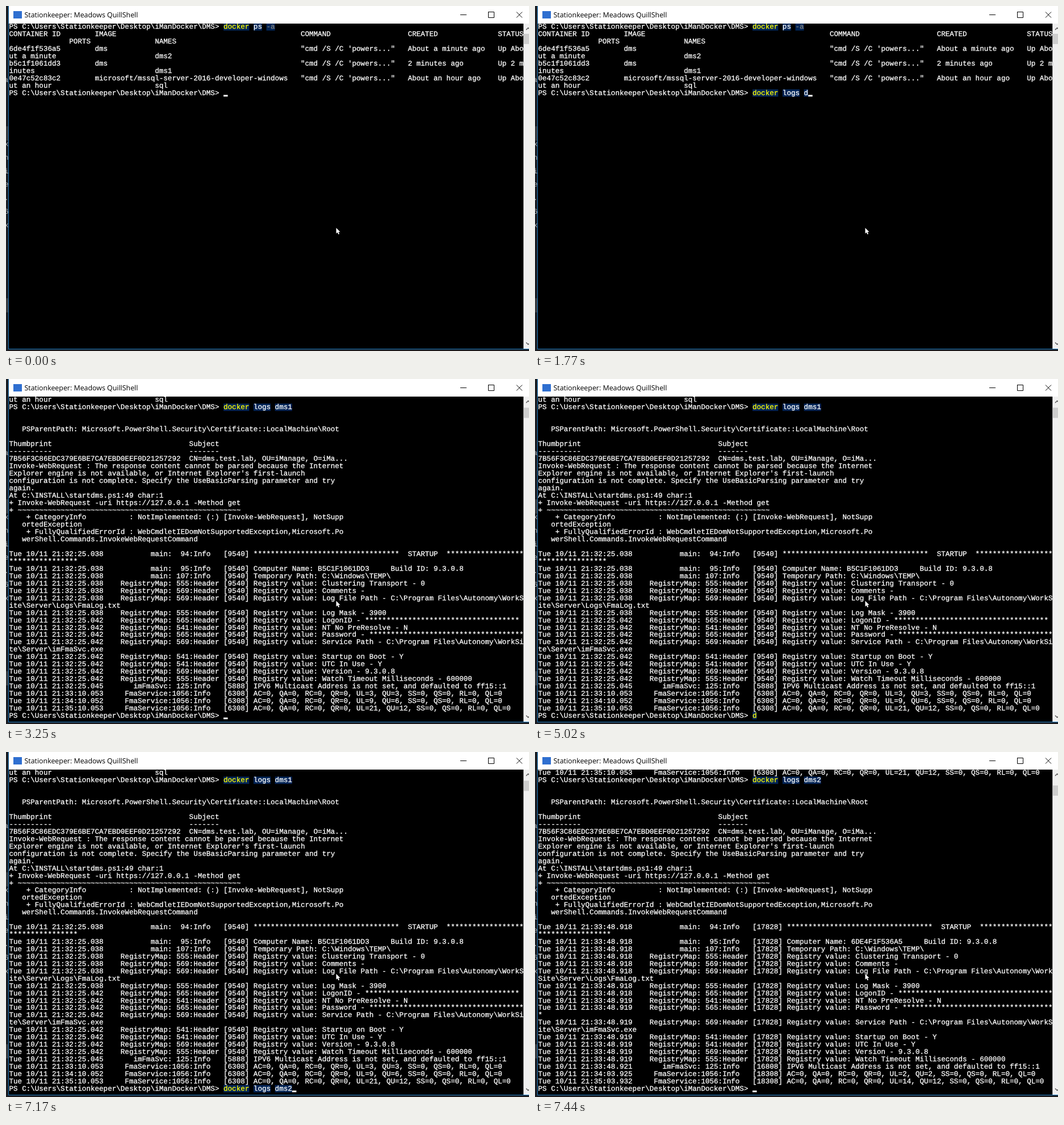
These frames come from a looping animation (921 px wide and 608 px high, 8000 ms). An HTML page with a canvas:

```html
<!DOCTYPE html>
<html lang="en">
<head>
<meta charset="utf-8">
<title>Terminal</title>
<style>
html, body { margin: 0; width: 100%; height: 100%; overflow: hidden; background: #000; }
canvas { display: block; }
</style>
</head>
<body>
<canvas id="stage" width="921" height="608"></canvas>
<script>
const ctx = document.getElementById('stage').getContext('2d');
const LOOP = 8000, COLS = 120, ROWS = 44;
const CELL_W = 7.55, CELL_H = 12.94, LEFT = 5.5, TOP = 30.4;
const RIGHT = LEFT + COLS * CELL_W, BAR_H = 31;
const MONO = '12.58px "Liberation Mono", "DejaVu Sans Mono", monospace';
const PROMPT = 'PS C:\\Users\\Stationkeeper\\Desktop\\iManDocker\\DMS> ';

// ---- Transcript ----
const wrap = line => line.match(new RegExp(`.{1,${COLS}}`, 'g')) || [''];
const stars = n => '*'.repeat(n);

const tableRow = cells => cells.map((c, i) => c.padEnd([20, 48, 25, 21, 20, 20][i])).join('');
const container = (id, image, created, status, name) =>
  tableRow([id, image, '"cmd /S /C \'powers..."', created, status, '', name]);

const listing = [
  PROMPT + 'docker ps -a',
  tableRow(['CONTAINER ID', 'IMAGE', 'COMMAND', 'CREATED', 'STATUS', 'PORTS', 'NAMES']),
  container('6de4f1f536a5', 'dms', 'About a minute ago', 'Up About a minute', 'dms2'),
  container('b5c1f1061dd3', 'dms', '2 minutes ago', 'Up 2 minutes', 'dms1'),
  container('0e47c52c83c2', 'microsoft/mssql-server-2016-developer-windows',
    'About an hour ago', 'Up About an hour', 'sql')
];

const request = 'Invoke-WebRequest -uri https://127.0.0.1 -Method get';
const startError = [
  '', '',
  '   PSParentPath: Microsoft.PowerShell.Security\\Certificate::LocalMachine\\Root',
  '',
  'Thumbprint'.padEnd(42) + 'Subject',
  '-'.repeat(10).padEnd(42) + '-'.repeat(7),
  '7B56F3C86EDC379E6BE7CA7EBD0EEF0D21257292  CN=dms.test.lab, OU=iManage, O=iMa...',
  'Invoke-WebRequest : The response content cannot be parsed because the Internet',
  "Explorer engine is not available, or Internet Explorer's first-launch",
  'configuration is not complete. Specify the UseBasicParsing parameter and try',
  'again.',
  'At C:\\INSTALL\\startdms.ps1:49 char:1',
  '+ ' + request,
  '+ ' + '~'.repeat(request.length),
  '    + CategoryInfo          : NotImplemented: (:) [Invoke-WebRequest], NotSupp',
  '   ortedException',
  '    + FullyQualifiedErrorId : WebCmdletIEDomNotSupportedException,Microsoft.Po',
  '   werShell.Commands.InvokeWebRequestCommand',
  ''
];

const entry = (time, name, num, level, pid, text) =>
  `Tue 10/11 ${time}${(name + ':').padStart(16)}${String(num).padStart(4)}:${level.padEnd(7)}[${pid}] ${text}`;

const server = 'C:\\Program Files\\Autonomy\\WorkSite\\Server\\';
const registry = [
  [555, 'Clustering Transport - 0'],
  [569, 'Comments -'],
  [569, `Log File Path - ${server}Logs\\FmaLog.txt`],
  [555, 'Log Mask - 3900'],
  [565, 'LogonID - ' + stars(36)],
  [541, 'NT No PreResolve - N'],
  [565, 'Password - ' + stars(36)],
  [569, `Service Path - ${server}imFmaSvc.exe`],
  [541, 'Startup on Boot - Y'],
  [541, 'UTC In Use - Y'],
  [569, 'Version - 9.3.0.8'],
  [555, 'Watch Timeout Milliseconds - 600000']
];

// Registry lines from index `split` on carry the later time stamp.
function serviceLog({ early, late, split, pid, host, ipv6, stats, statPid }) {
  const main = (num, text) => entry(early, 'main', num, 'Info', pid, text);
  return [
    ...startError,
    main(94, `${stars(34)}  STARTUP  ${stars(34)}`),
    main(95, `Computer Name: ${host}     Build ID: 9.3.0.8`),
    main(107, 'Temporary Path: C:\\Windows\\TEMP\\'),
    ...registry.map(([num, text], i) =>
      entry(i < split ? early : late, 'RegistryMap', num, 'Header', pid, 'Registry value: ' + text)),
    entry(ipv6[0], 'imFmaSvc', 125, 'Info', ipv6[1],
      'IPV6 Multicast Address is not set, and defaulted to ff15::1'),
    ...stats.map(([time, ul, qu]) => entry(time, 'FmaService', 1056, 'Info', statPid,
      `AC=0, QA=0, RC=0, QR=0, UL=${ul}, QU=${qu}, SS=0, QS=0, RL=0, QL=0`))
  ];
}

const firstLog = serviceLog({
  early: '21:32:25.038', late: '21:32:25.042', split: 4, pid: 9540, host: 'B5C1F1061DD3',
  ipv6: ['21:32:25.045', 5888], statPid: 6308,
  stats: [['21:33:10.053', 3, 3], ['21:34:10.052', 9, 6], ['21:35:10.053', 21, 12]]
});
const secondLog = serviceLog({
  early: '21:33:48.918', late: '21:33:48.919', split: 5, pid: 17828, host: '6DE4F1F536A5',
  ipv6: ['21:33:48.921', 16808], statPid: 18308,
  stats: [['21:34:03.925', 2, 2], ['21:35:03.932', 14, 12]]
});

const CMD1 = 'docker logs dms1', CMD2 = 'docker logs dms2';
const buffer1 = listing.flatMap(wrap);
const buffer2 = [...buffer1, PROMPT + CMD1, ...firstLog.flatMap(wrap)];
const buffer3 = [...buffer2, PROMPT + CMD2, ...secondLog.flatMap(wrap)];

// ---- Timeline ----
// [time, characters typed]
const typing1 = [[400, 2], [530, 3], [670, 5], [790, 6], [940, 8], [1220, 10], [1370, 11], [1490, 12],
  [1770, 13], [1890, 14], [2010, 15], [2560, 14], [2700, 15], [2980, 16]];
const typing2 = [[5020, 1], [5170, 3], [5290, 4], [5440, 6], [5590, 7], [5710, 8], [5860, 9],
  [5980, 10], [6100, 12], [6380, 13], [6530, 14], [6650, 15], [7170, 16]];
const caretOff = [[2410, 2560], [2980, 3110], [4060, 4460], [5020, 5170]];

const typed = (cmd, keys, t) =>
  PROMPT + cmd.slice(0, keys.reduce((n, [at, count]) => t >= at ? count : n, 0));

function screenAt(t) {
  if (t < 3250) {
    const lines = [...buffer1, typed(CMD1, typing1, t)];
    if (t >= 3110) lines.push('');
    return { lines, scroll: 0 };
  }
  if (t < 7320) return { lines: [...buffer2, typed(CMD2, typing2, t)], scroll: 8 };
  if (t < 7440) return { lines: [...buffer3.slice(0, 84), ''], scroll: 41 };
  return { lines: [...buffer3, PROMPT], scroll: 50 };
}

// ---- Drawing ----
function rect(color, x, y, w, h) {
  ctx.fillStyle = color;
  ctx.fillRect(x, y, w, h);
}

function stroke(color, width, ...paths) {
  ctx.strokeStyle = color;
  ctx.lineWidth = width;
  ctx.beginPath();
  for (const [[x, y], ...rest] of paths) {
    ctx.moveTo(x, y);
    rest.forEach(p => ctx.lineTo(...p));
  }
  ctx.stroke();
}

const cellX = col => LEFT + col * CELL_W;
const cellY = row => TOP + row * CELL_H;

// A hairline outline gives the glyphs a slightly heavier weight.
function print(text, col, row, color = '#fff') {
  ctx.fillStyle = ctx.strokeStyle = color;
  ctx.lineWidth = 0.3;
  [...text].forEach((ch, i) => {
    if (ch === ' ') return;
    ctx.fillText(ch, cellX(col + i), cellY(row) + 10);
    ctx.strokeText(ch, cellX(col + i), cellY(row) + 10);
  });
}

function printLine(line, row) {
  if (!line.startsWith(PROMPT)) return print(line, 0, row);
  print(PROMPT, 0, row);
  for (const { 0: word, index } of line.slice(PROMPT.length).matchAll(/\S+/g)) {
    const col = PROMPT.length + index;
    rect('#012456', cellX(col), cellY(row), word.length * CELL_W, CELL_H);
    print(word, col, row, index === 0 ? '#ffff00' : word[0] === '-' ? '#808080' : '#fff');
  }
}

function drawTerminal(t, { lines, scroll }) {
  ctx.save();
  ctx.beginPath();
  ctx.rect(5, BAR_H, RIGHT - 5, 604 - BAR_H);
  ctx.clip();
  rect('#000', 5, BAR_H, RIGHT - 5, 604 - BAR_H);
  ctx.font = MONO;
  ctx.textAlign = 'left';
  lines.slice(scroll, scroll + ROWS).forEach(printLine);
  if (!caretOff.some(([from, to]) => t >= from && t < to)) {
    const row = lines.length - 1;
    rect('#fff', cellX(lines[row].length), cellY(row - scroll) + 9.8, CELL_W, 2.9);
  }
  ctx.restore();
}

function drawBackdrop() {
  rect('#1c1f24', 0, 0, 921, 608);
  rect('#3a3d41', 0, 212, 4, 25);
  rect('#3a3d41', 0, 515, 4, 25);
  ctx.font = MONO;
  ctx.textAlign = 'right';
  ctx.fillStyle = '#b4b8bc';
  ctx.fillText('a', 4, 134);
  [...'xnie.6x'].forEach((ch, i) => ctx.fillText(ch, 4.5, 247 + i * 23.8));
}

function drawWindow(scroll) {
  rect('#1a77bd', 4, 0, 917, 605);
  rect('#fff', 5, 0, 916, BAR_H);
  rect('#2f6fd0', 13, 9, 15, 13);
  ctx.font = '12.4px "Open Sans", "Noto Sans", sans-serif';
  ctx.textAlign = 'left';
  ctx.fillStyle = '#000';
  ctx.fillText('Stationkeeper: Meadows QuillShell', 32.5, 20.3);
  stroke('#000', 1,
    [[800, 15.5], [811, 15.5]],
    [[849.5, 10.5], [859.5, 10.5], [859.5, 20.5], [849.5, 20.5], [849.5, 10]],
    [[899, 10.5], [909, 20.5]],
    [[909, 10.5], [899, 20.5]]);

  rect('#f0f0f0', 911, BAR_H, 10, 604 - BAR_H);
  rect('#cdcdcd', 912, 49 + scroll * 0.2, 9, 18);
  stroke('#505050', 1.3,
    [[916, 42], [919.5, 38.5], [923, 42]],
    [[916, 593], [919.5, 596.5], [923, 593]]);
}

function drawPointer() {
  const arrow = new Path2D('M581.5 391v10l2.3-2.1 1.6 3.6 1.7-.8-1.6-3.4h3.1z');
  ctx.lineWidth = 1;
  ctx.strokeStyle = '#000';
  ctx.stroke(arrow);
  ctx.fillStyle = '#fff';
  ctx.fill(arrow);
}

function frame() {
  const t = performance.now() % LOOP;
  const screen = screenAt(t);
  ctx.textRendering = 'geometricPrecision';
  drawBackdrop();
  drawWindow(screen.scroll);
  drawTerminal(t, screen);
  drawPointer();
  requestAnimationFrame(frame);
}
frame();
</script>
</body>
</html>
```
